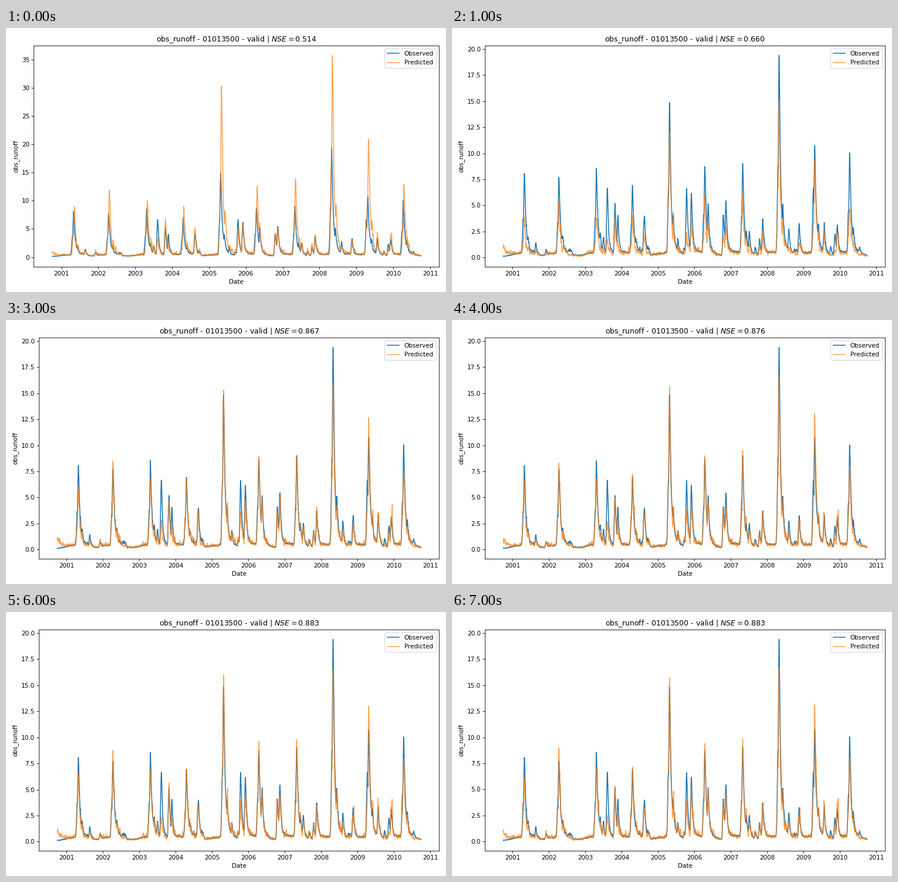
A matplotlib script for the animation above (8000 ms loop, 750x450 px).

```python
import matplotlib.pyplot as plt
import numpy as np
from matplotlib.animation import FuncAnimation

W, H, DPI = 750, 450, 75
DAYS = 3652
LOW = .1
t = 2000.75 + np.arange(DAYS) / 365.25

# Spring floods: date, observed peak, share of it the trained model reaches
FLOODS = [
    (2001.33, 8.1, .81), (2002.28, 7.8, 1.1), (2003.31, 8.35, .86),
    (2004.30, 6.8, .97), (2005.32, 14.9, 1.08), (2006.29, 8.6, 1.0),
    (2007.33, 9.0, 1.08), (2008.33, 19.35, .86), (2009.31, 10.8, 1.2),
    (2010.27, 10.1, .83),
]

# Largest storms: date, observed peak
STORMS = [
    (2003.61, 6.8), (2003.82, 5.5), (2003.90, 4.1), (2004.62, 4.1),
    (2005.79, 7.1), (2005.92, 6.45), (2006.38, 5.1), (2006.80, 4.5),
    (2006.87, 5.8), (2007.88, 4.0), (2008.60, 3.1), (2008.88, 3.2),
    (2009.27, 6.6), (2009.57, 3.4), (2009.93, 3.3),
]

SCORES = [.514, .660, .825, .867, .876, .884, .883, .883]
GAINS = [1.38, .57, .93, .95, .98, 1.02, 1, 1]

base = .28 + .15 * np.sin(2 * np.pi * t)


def hydrograph(events):
    """Quick rises and slow recessions over a seasonal base flow."""
    flow = np.zeros(DAYS)
    for date, peak, fall in events:
        dt = t - date
        rise = np.exp(-(np.minimum(dt, 0) / .027) ** 2)
        drop = (1 + (np.maximum(dt, 0) / fall) ** 1.5) ** -1.2
        flow = np.maximum(flow, max(peak - .4, .1) * rise * drop)
    return base + flow


def melt(date, peak):
    """A spring flood with its early shoulder and a later bump."""
    return [(date - .03, .45 * peak, .03), (date, peak, .04),
            (date + .1, .27 * peak, .04)]


def noise(seed):
    rng = np.random.default_rng(seed)
    n = np.convolve(rng.normal(size=DAYS), np.exp(-np.arange(40) / 5))[:DAYS]
    return n / n.std()


def roughen(flow, n, amount):
    """Noise that fades out towards the high peaks."""
    return np.maximum(flow * np.exp(amount * n / (1 + (flow / 4) ** 2)), LOW)


rng = np.random.default_rng(4)
dates = rng.uniform(2000.87, 2010.7, 80)
dates = dates[dates % 1 > .38]
showers = [(d, .5 + rng.exponential(.7)) for d in dates]
storms = STORMS + showers
shares = rng.uniform(.45, .95, len(storms))
shared_noise = noise(1)

events = [(d, p, .035) for d, p in storms]
for date, peak, _ in FLOODS:
    events += melt(date, peak)
observed = roughen(hydrograph(events), noise(2), .08)


def predict(step):
    gain = GAINS[step]
    tilt = .5 if step < 2 else 0  # early on, high floods are amplified most
    lag = .02 if step == 0 else 0
    events = [(d, p * s * gain ** .7, .04) for (d, p), s in zip(storms, shares)]
    for date, peak, reach in FLOODS:
        events += melt(date + lag, peak * reach * gain * (peak / 8) ** tilt)
    warm_up = .8 * np.exp((t[0] - t) / .15)
    n = .8 * shared_noise + .6 * noise(10 + step)
    return roughen(hydrograph(events) + warm_up, n, .24)


fig, ax = plt.subplots(figsize=(W / DPI, H / DPI), dpi=DPI)
ax.plot(t, observed, color="C0", label="Observed")
line, = ax.plot(t, observed, color="C1", alpha=.7, label="Predicted")
ax.set_xticks(range(2001, 2012))
ax.set_xlim(t[0] - .5, t[-1] + .5)
ax.set_xlabel("Date")
ax.set_ylabel("obs_runoff")
ax.legend(loc="upper right")


def update(step):
    line.set_data(t, predict(step))
    ax.relim()
    ax.autoscale_view(scalex=False)
    left = 47.4 if step == 0 else 56.4  # room for the tick labels
    ax.set_position([left / W, 43.4 / H, (738.4 - left) / W, 377 / H])
    ax.set_title(f"obs_runoff - 01013500 - valid | $NSE={SCORES[step]:.3f}$")
    return line,


anim = FuncAnimation(fig, update, frames=len(SCORES), interval=1000, repeat=True)
plt.show()
```
